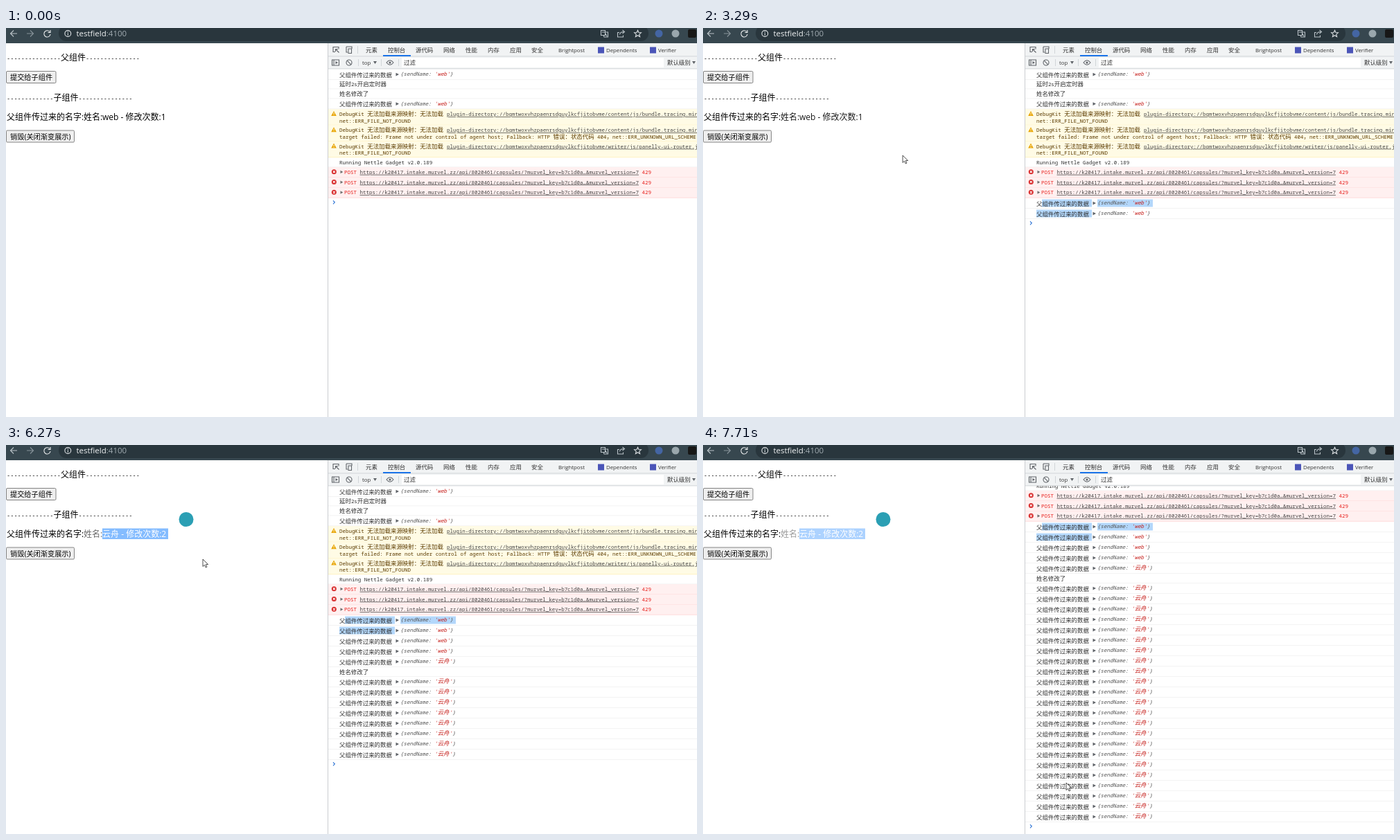
Write an HTML page that moves like this. It is 997x562 px and loops after 8 s.

```html
<!DOCTYPE html>
<html lang="zh">
<head>
<meta charset="utf-8">
<style>
html, body { margin: 0; width: 100%; height: 100%; overflow: hidden; background: #fff; }
svg { display: block; width: 997px; height: 562px; }
text { white-space: pre; font: 12px "Open Sans", sans-serif; }
.c { font-family: "Noto Sans CJK SC", "Noto Sans CJK", sans-serif; }
.dash { font: 8.65px "DejaVu Sans Mono", monospace; }
.btn { font-size: 10.2px; }
.url { font-size: 11.5px; }
.ui { font-size: 7.8px; fill: #333; }
.mono { font: 7.46px "Noto Sans Mono", monospace; fill: #303030; }
.ui .c, .mono .c { font-size: 8.45px; }
.obj { font-style: italic; fill: #565656; }
.str { fill: #c41a16; }
.warn { fill: #5c3c00; }
.err { fill: #e8201c; }
.link { fill: #454545; text-decoration: underline; }
.line { fill: none; stroke-width: 1.1; }
</style>
</head>
<body>
<svg id="stage" viewBox="0 0 997 562" xmlns="http://www.w3.org/2000/svg"></svg>
<script>
const LOOP = 8000, ROW = 15, TOP = 245.5;
const OLD = 'web', NEW = '云舟';
const $ = id => document.getElementById(id);
const show = (id, on) => { $(id).style.display = on ? '' : 'none'; };
const clamp = (v, a, b) => Math.max(a, Math.min(b, v));
const within = (t, a, b) => t >= a && t < b;

// --- markup helpers ---
const cjk = s => s.replace(/[\u3000-\uffef]+/g, m => `<tspan class="c">${m}</tspan>`);
const text = (x, y, s, cls = '', fill = '') =>
  `<text x="${x}" y="${y}" class="${cls}"${fill && ` fill="${fill}"`}>${cjk(s)}</text>`;
const rect = (x, y, w, h, fill, more = '') =>
  `<rect x="${x}" y="${y}" width="${w}" height="${h}" fill="${fill}" ${more}/>`;
const dot = (x, y, r, fill) => `<circle cx="${x}" cy="${y}" r="${r}" fill="${fill}"/>`;
const path = (d, stroke = '#5f6368') => `<path class="line" stroke="${stroke}" d="${d}"/>`;
const solid = (d, fill) => `<path d="${d}" fill="${fill}"/>`;
const group = (id, s) => `<g id="${id}">${s}</g>`;

// --- browser bar ---
function browserBar() {
  const ink = '#dfe3e6';
  return rect(0, 0, 997, 22, '#37474f') + rect(76, -4, 851, 23, '#29363d', 'rx="11"') +
    path('M16 8H6.5M11 3.5L6.5 8L11 12.5', '#b9c2c7') +
    path('M30 8H39.5M35 3.5L39.5 8L35 12.5', '#87939a') +
    path('M63 5.5A4.6 4.6 0 1 0 64 9M64 3V6.5H60.5', '#f1f3f4') +
    path('M93.7 8a4.4 4.4 0 1 0-8.8 0a4.4 4.4 0 1 0 8.8 0M89.3 7.4V10.5M89.3 5.3V6.4', ink) +
    `<text x="101.5" y="12" class="url" fill="#f1f3f4">testfield<tspan fill="#a3adb3">:4100</tspan></text>` +
    path('M858.5 3.5h6v7h-6zM862 6h6.5v7h-5.5l-1-2.5M860 6h3M865 8l2 4', '#b9c2c7') +
    path('M885 6.5h-2.5v6.5h8v-2.5M885.5 9.5q.5-4 6-4M889.5 3l3 2.5l-3 2.5', '#b9c2c7') +
    path('M911.5 3.3l1.4 3.2l3.5.3l-2.7 2.3l.9 3.5l-3.1-1.9l-3.1 1.9l.9-3.5l-2.7-2.3l3.5-.3z', ink) +
    dot(942, 8, 5.5, '#4465a3') + dot(966, 8, 5.5, '#9aa7ad') + rect(984, 2, 12, 12, '#171717', 'rx="2"');
}

// --- page on the left ---
const dashes = (x, y, n) => text(x, y, '-'.repeat(n), 'dash');
const button = (id, y, w, label) =>
  rect(.5, y, w, 17, '#efefef', `id="${id}" rx="1.5" stroke="#767676" stroke-width=".9"`) +
  text(6, y + 12.5, label, 'btn');

function page() {
  const renamed = NEW + ' - 修改次数:2';
  return dashes(1, 47, 15) + text(79, 47.3, '父组件') + dashes(115, 47, 15) +
    button('send', 62.5, 71.5, '提交给子组件') +
    dashes(1, 104.5, 13) + text(68.5, 104.8, '子组件') + dashes(104.5, 104.5, 15) +
    text(1, 132.5, '父组件传过来的名字:') +
    group('fade',
      text(112, 132.5, '姓名:') +
      group('before', text(139, 132.5, OLD + ' - 修改次数:1')) +
      group('after', text(139, 132.5, renamed) +
        rect(139, 120.5, 0, 15.5, '#3390ff', 'id="mark"') +
        `<g clip-path="url(#markClip)">${text(139, 132.5, renamed, '', '#fff')}</g>`)) +
    button('drop', 148, 98, '销毁(关闭渐变展示)') +
    group('badge', dot(260, 107.5, 10.5, '#2b9fb4'));
}

// --- tool panel chrome ---
function panelBars() {
  const tabs = [[519, '元素'], [551, '控制台'], [591, '源代码'], [631, '网络'], [663, '性能'], [695, '内存'],
    [727, '应用'], [758, '安全'], [797, 'Brightpost'], [866, 'Dependents'], [941, 'Verifier']];
  return rect(465, 22, 532, 37, '#f1f3f4') + rect(465, 40.5, 532, .8, '#cacdd1') + rect(465, 58.5, 532, .8, '#cacdd1') +
    path('M475 34.5h-3v-7h8v3M475.5 30.5l5 5M475.5 34v-3.5h3.5') +
    path('M491 27h8v3M491 27v8h2M494 30h4.5v6.5h-4.5z') +
    rect(507, 26, .8, 11, '#cacdd1') +
    tabs.map(([x, s]) => text(x, 35, s, 'ui')).join('') +
    rect(544, 39, 40, 2, '#1a73e8') +
    rect(854, 27.5, 9, 9, '#4b55b8') + rect(929, 27.5, 9, 9, '#4b55b8') +
    path('M470.5 46h10v8h-10zM473 46v8') + solid('M475.5 48l3.5 2l-3.5 2z', '#5f6368') +
    path('M499 50a4 4 0 1 0-8 0a4 4 0 1 0 8 0M492.2 47.2l5.6 5.6') +
    rect(508, 45, .8, 10, '#cacdd1') + text(514, 52.8, 'top', 'ui') + solid('M530 48h5l-2.5 4z', '#5f6368') +
    rect(541, 45, .8, 10, '#cacdd1') +
    path('M549 50q5-6.5 10 0q-5 6.5-10 0z') + dot(554, 50, 1.6, '#5f6368') +
    rect(566, 45, .8, 10, '#cacdd1') +
    rect(571, 43, 378, 14, '#fff') + text(574, 53, '过滤', 'ui') +
    text(954, 53, '默认级别', 'ui') + solid('M990 48h5l-2.5 4z', '#5f6368');
}

// --- console rows ---
const rule = (y, color = '#f0f0f0') => rect(465, y - .5, 532, .8, color);
const plainRow = (y, s) => text(481, y + 10, s, 'mono') + rule(y + 14);
const dataRow = (y, name) =>
  text(481, y + 11, '父组件传过来的数据', 'mono') + solid(`M562.5 ${y + 5.2}l4.5 2.4l-4.5 2.4z`, '#5f6368') +
  `<text x="569" y="${y + 9.8}" class="mono obj">{sendName: <tspan class="str">'${cjk(name)}'</tspan>}</text>` +
  rule(y + 15);

function warnRow(y, tail, second) {
  const id = 'bqmtwoxvhzpaenrsdguylkcfjitobvme';
  return rect(465, y, 532, 23.3, '#fffbe5') + rule(y + 23.3, '#fff0b8') +
    solid(`M473 ${y + 3}l3.8 7h-7.6z`, '#e8a400') + rect(472.6, y + 5.3, .9, 2.4, '#fff') + rect(472.6, y + 8.3, .9, .9, '#fff') +
    text(481, y + 10, 'DebugKit 无法加载来源映射：无法加载', 'mono warn') +
    text(636, y + 10, `plugin-directory://${id}/${tail}`, 'mono link') + second;
}

function errorRow(y) {
  const url = 'https://k20417.intake.murvel.zz/api/8020461/capsules/?murvel_key=b7c1d0a…&amp;murvel_version=7';
  return rect(465, y, 532, 14.8, '#fff0f0') + rule(y + 14.8, '#ffd6d6') + dot(473.3, y + 6.7, 3.5, '#d92f2f') +
    path(`M472 ${y + 5.4}l2.6 2.6m0-2.6l-2.6 2.6`, '#fff') +
    solid(`M482.5 ${y + 4.8}l3.8 2.2l-3.8 2.2z`, '#6e6e6e') +
    text(488, y + 9.8, 'POST', 'mono err') + text(510.5, y + 9.8, url, 'mono link') + text(917.5, y + 9.8, '429', 'mono err');
}

// bursts of new rows: start, amount, gap
const bursts = [[1330, 1, 0], [2340, 1, 0], [3350, 2, 35], [4330, 2, 0],
  [4380, 4, 35], [5370, 4, 35], [6380, 8, 35], [7390, 7, 50]];
const births = bursts.flatMap(([at, n, gap]) => Array.from({ length: n }, (_, i) => at + i * gap));
const rowTop = i => TOP + ROW * i - (i > 5 ? 1 : 0);

function consoleRows() {
  const second = (y, s) => text(481, y + 19.5, s, 'mono warn');
  const missing = y => second(y, 'net::ERR_FILE_NOT_FOUND');
  const failed = 'target failed: Frame not under control of agent host; Fallback: HTTP 错误：状态代码 404，net::ERR_UNKNOWN_URL_SCHEME';
  const bundle = 'content/js/bundle.tracing.min';
  return dataRow(59.5, OLD) + group('hover1', rect(465, 74, 532, 14, '#e9f0f8')) +
    rect(481, 75.5, 0, 11, '#b3d7fb', 'id="pick0"') +
    plainRow(74, '延时2s开启定时器') + plainRow(88, '姓名修改了') + dataRow(102, OLD) +
    warnRow(117, bundle, missing(117)) +
    warnRow(140.2, bundle, group('short', second(140.2, failed)) + group('long', second(140.2, 'through ' + failed))) +
    warnRow(163.6, 'writer/js/panelly-ui-router.js', missing(163.6)) +
    plainRow(187, 'Running Nettle Gadget v2.0.189') +
    [201, 215.7, 230.5].map(errorRow).join('') +
    group('hover2', rect(465, TOP, 532, ROW, '#ebf1f9')) +
    rect(489, TOP + 2, 0, 11, '#b3d7fb', 'id="pick1" clip-path="url(#runs)"') +
    rect(481, TOP + 17, 0, 11, '#b3d7fb', 'id="pick2"') +
    births.map((_, i) => group('row' + i,
      i === 5 ? plainRow(rowTop(i), '姓名修改了') : dataRow(rowTop(i), i < 4 ? OLD : NEW))).join('') +
    group('prompt', path('M472 3.8l2.3 2.5l-2.3 2.5', '#2a72d4'));
}

$('stage').innerHTML =
  `<defs><clipPath id="view"><rect x="465" y="59" width="532" height="503"/></clipPath>
   <clipPath id="runs"><path d="M481 240h80v25h-80zM569 240h80v25h-80z"/></clipPath>
   <clipPath id="markClip"><rect id="markBox" x="139" y="120.5" height="15.5"/></clipPath></defs>` +
  rect(0, 0, 997, 562, '#fff') + page() +
  `<g clip-path="url(#view)">${group('scroll', consoleRows())}</g>` +
  panelBars() + rect(464, 22, 1, 540, '#cacdd1') + browserBar() +
  group('pointer', group('glow', `<circle cx="1" cy="3" r="9" fill="#ffe81a" opacity=".65"/>`) +
    `<path d="M0 0V10.5L2.5 8.3L4.2 12L5.9 11.2L4.3 7.6H7.6Z" fill="#fff" stroke="#222" stroke-width=".8"/>`);

// --- motion ---
// pointer stops: time, x, y
const route = [[70, 966, 552], [860, 499, 89], [940, 494, 84], [1080, 485, 77], [1220, 485, 80], [1420, 514, 82],
  [1600, 549, 81], [1720, 556, 68], [1970, 545, 88], [2400, 491, 253], [2480, 491, 253], [2750, 561, 267], [2870, 561, 267],
  [3630, 91, 124], [3980, 31, 68], [4400, 31, 68], [5030, 139, 127], [5200, 139, 127], [5650, 236, 127], [5860, 236, 127],
  [6270, 284, 165], [6970, 554, 436], [7450, 528, 480], [7710, 524, 488]];
const presses = [[1220, 1620], [2400, 2780], [4180, 4330], [5200, 5700]];

function pointerAt(t) {
  const i = route.findIndex(p => p[0] > t);
  if (i < 0) return route[route.length - 1].slice(1);
  if (i === 0) return route[0].slice(1);
  const [a, b] = [route[i - 1], route[i]];
  const u = (t - a[0]) / (b[0] - a[0]), e = u * u * (3 - 2 * u);
  return [a[1] + (b[1] - a[1]) * e, a[2] + (b[2] - a[2]) * e];
}

const setWidth = (id, w) => $(id).setAttribute('width', Math.max(0, w));

function draw(t) {
  const [x, y] = pointerAt(t);
  $('pointer').setAttribute('transform', `translate(${x} ${y})`);
  show('pointer', t >= 70);
  show('glow', presses.some(([a, b]) => within(t, a, b)));

  const count = births.filter(b => b <= t).length;
  births.forEach((_, i) => show('row' + i, i < count));
  const end = rowTop(count), shift = Math.max(0, end - 544.5);
  $('prompt').setAttribute('transform', `translate(0 ${end})`);
  $('scroll').setAttribute('transform', `translate(0 ${-shift})`);
  show('short', !shift);
  show('long', shift);

  show('hover1', within(t, 1220, 1640));
  show('hover2', within(t, 2350, 2750));
  setWidth('pick0', within(t, 1220, 2400) ? clamp(x, 481, 549) - 481 : 0);
  const lower = t > 2750 || y > 260;
  setWidth('pick1', t < 2480 ? 0 : lower ? 160 : x - 489);
  setWidth('pick2', t < 2480 || !lower ? 0 : (t > 2750 ? 561 : x) - 481);

  const ticks = Math.floor((t - 1330) / 1010) + 1;
  $('fade').setAttribute('opacity', Math.min(1, 1.1 - .1 * ticks));
  show('before', t < 4330);
  show('after', t >= 4330);
  const marked = t < 5200 ? 0 : t > 5650 ? 95 : clamp(x, 139, 234) - 139;
  setWidth('mark', marked);
  setWidth('markBox', marked);
  $('send').setAttribute('fill', within(t, 3880, 4560) ? '#e6e6e6' : '#efefef');
  show('badge', t >= 5860);
}

function frame() {
  draw(performance.now() % LOOP);
  requestAnimationFrame(frame);
}
frame();
</script>
</body>
</html>
```
